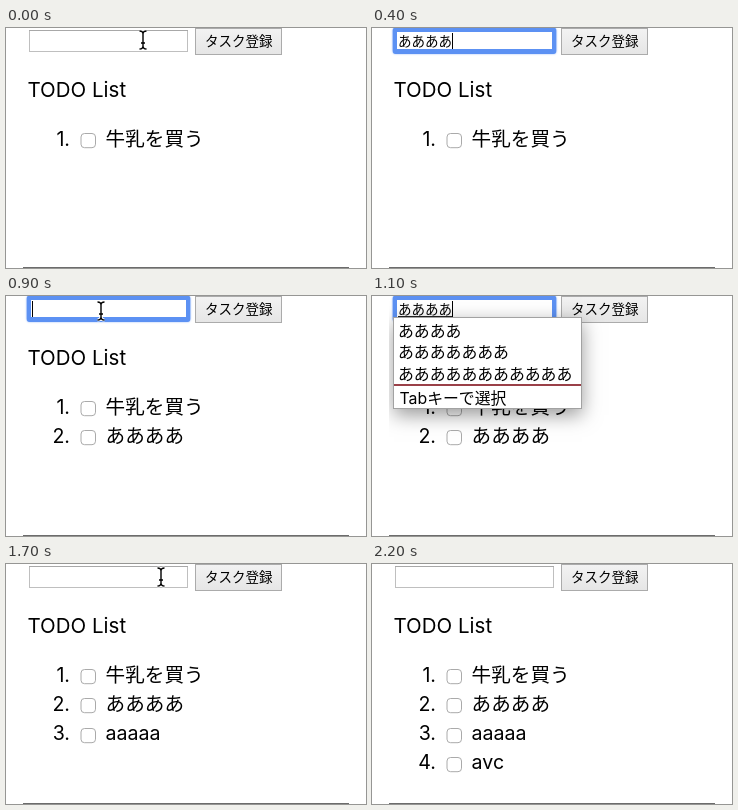
Recreate the animation shown at these times as an HTML page with a canvas. Size 360 by 240 pixels, loop 2.4 s.

```html
<!DOCTYPE html>
<html lang="ja">
<head>
<meta charset="utf-8">
<title>TODO List</title>
<style>
html, body { margin: 0; width: 100%; height: 100%; overflow: hidden; background: #fff; }
canvas { display: block; width: 360px; height: 240px; }
</style>
</head>
<body>
<canvas id="stage" width="360" height="240"></canvas>
<script>
const ctx = document.getElementById('stage').getContext('2d');
const LOOP = 2400, STEP = 100;
const FAMILY = 'Inter, "Noto Sans CJK JP", "Noto Sans CJK", sans-serif';
const ITEMS = ['牛乳を買う', 'ああああ', 'aaaaa', 'avc'];
const A = n => 'あ'.repeat(n);

const beam = (x, y) => ({ kind: 'beam', x, y });
const arrow = (x, y) => ({ kind: 'arrow', x, y });
const idle = (items, pointer) => ({ items, text: '', focus: false, pointer });
const typing = (items, text, pointer) => ({ items, text, focus: true, pointer });

// one entry per 100 ms; the last one holds to the end of the loop
const timeline = [
  idle(1, beam(137, 12)),
  typing(1, '', beam(137, 12)),
  { ...typing(1, A(1)), composing: true },
  { ...typing(1, A(3)), composing: true },
  typing(1, A(4)),
  typing(1, A(4), arrow(228, 13)),
  idle(2, arrow(264, 12)),
  idle(2, arrow(240, 13)),
  idle(2, beam(130, 14)),
  typing(2, '', beam(95, 15)),
  { ...typing(2, A(2)), composing: true },
  { ...typing(2, A(4)), composing: true, popup: true },
  typing(2, ''),
  typing(2, 'aa'),
  typing(2, 'aaaaa'),
  typing(2, 'aaaaa', arrow(232, 13)),
  idle(3, arrow(252, 12)),
  idle(3, beam(155, 13)),
  typing(3, '', beam(140, 13)),
  typing(3, 'a'),
  typing(3, 'avc'),
  idle(4, arrow(240, 12)),
  idle(4)
];

function rect(x, y, w, h, color) {
  ctx.fillStyle = color;
  ctx.fillRect(x, y, w, h);
}

function frame(x, y, w, h, color) {
  ctx.strokeStyle = color;
  ctx.lineWidth = 1;
  ctx.strokeRect(x + .5, y + .5, w - 1, h - 1);
}

function label(text, x, y, size, align = 'left') {
  ctx.font = size + 'px ' + FAMILY;
  ctx.textAlign = align;
  ctx.fillStyle = '#000';
  ctx.fillText(text, x, y);
  return ctx.measureText(text).width;
}

function drawInput(s) {
  if (s.focus) {
    ctx.save();
    ctx.shadowColor = 'rgba(70,130,245,.6)';
    ctx.shadowBlur = 2;
    ctx.fillStyle = '#5c91f3';
    ctx.beginPath();
    ctx.roundRect(20.7, -.5, 163.6, 26.5, 3);
    ctx.fill();
    ctx.restore();
    rect(25, 4, 155, 17, '#fff');
  } else {
    rect(23, 2, 159, 22, '#fff');
    frame(23, 2, 159, 22, '#bfbfbf');
    rect(23, 2, 159, 1, '#a8a8a8');
  }
  const w = label(s.text, 26, 18, 13.5);
  if (s.composing) rect(26, 20, w, 1, '#222');
  if (s.focus) rect(Math.round(26 + w), 5, 1, 16, '#000');
}

function drawButton() {
  const g = ctx.createLinearGradient(0, 0, 0, 26);
  g.addColorStop(0, '#f3f3f3');
  g.addColorStop(1, '#e6e6e6');
  rect(189, 0, 87, 27, g);
  frame(189, 0, 87, 27, '#ababab');
  label('タスク登録', 199, 18.3, 13.5);
}

function drawItem(text, i) {
  const y = 117.5 + i * 29.3, top = Math.round(105 + i * 29.3);
  label(i + 1 + '.', 64, y, 19.6, 'right');
  ctx.beginPath();
  ctx.roundRect(75, top + .5, 14.5, 14.2, 3.5);
  ctx.fillStyle = '#fff';
  ctx.fill();
  ctx.strokeStyle = '#aaa';
  ctx.lineWidth = 1;
  ctx.stroke();
  label(text, 99.6, y, 19.6);
}

function drawPopup() {
  ctx.save();
  ctx.beginPath();
  ctx.rect(17, 0, 326, 240);
  ctx.clip();
  ctx.shadowColor = 'rgba(0,0,0,.4)';
  ctx.shadowBlur = 18;
  ctx.shadowOffsetY = 6;
  rect(21.5, 21, 188, 92, '#fff');
  ctx.restore();
  frame(21, 21, 189, 92, '#a2a2a2');
  [4, 7, 11].forEach((n, i) => label(A(n), 26, 40.5 + i * 21.6, 15.85));
  rect(22, 88, 187, 2, '#9a4048');
  label('Tabキーで選択', 27.5, 108, 15.85);
}

function drawBeam(x, y) {
  for (const [color, width] of [['#fff', 3.2], ['#000', 1.4]]) {
    ctx.strokeStyle = color;
    ctx.lineWidth = width;
    ctx.beginPath();
    ctx.moveTo(x - 3.5, y - 9);
    ctx.quadraticCurveTo(x, y - 9, x, y - 6);
    ctx.lineTo(x, y + 6);
    ctx.quadraticCurveTo(x, y + 9, x - 3.5, y + 9);
    ctx.moveTo(x + 3.5, y - 9);
    ctx.quadraticCurveTo(x, y - 9, x, y - 6);
    ctx.moveTo(x, y + 6);
    ctx.quadraticCurveTo(x, y + 9, x + 3.5, y + 9);
    ctx.moveTo(x - 2, y + 3);
    ctx.lineTo(x + 2, y + 3);
    ctx.stroke();
  }
}

function drawArrow(x, y) {
  ctx.beginPath();
  ctx.moveTo(x, y);
  for (const [dx, dy] of [[0, 16], [3.7, 12.6], [6.2, 18.4], [8.8, 17.3], [6.4, 11.6], [11.4, 11.4]])
    ctx.lineTo(x + dx, y + dy);
  ctx.closePath();
  ctx.fillStyle = '#000';
  ctx.fill();
  ctx.strokeStyle = '#fff';
  ctx.lineWidth = 1.2;
  ctx.stroke();
}

function draw(s) {
  rect(0, 0, 360, 240, '#fff');
  drawInput(s);
  drawButton();
  label('TODO List', 21.5, 68.5, 20.5);
  ITEMS.slice(0, s.items).forEach(drawItem);
  rect(17, 239, 326, 1, '#6c6c6c');
  if (s.popup) drawPopup();
  if (s.pointer) {
    const { kind, x, y } = s.pointer;
    (kind === 'beam' ? drawBeam : drawArrow)(x, y);
  }
}

const start = performance.now();
function tick() {
  const t = (performance.now() - start) % LOOP;
  draw(timeline[Math.min(Math.floor(t / STEP), timeline.length - 1)]);
  requestAnimationFrame(tick);
}
tick();
</script>
</body>
</html>
```
